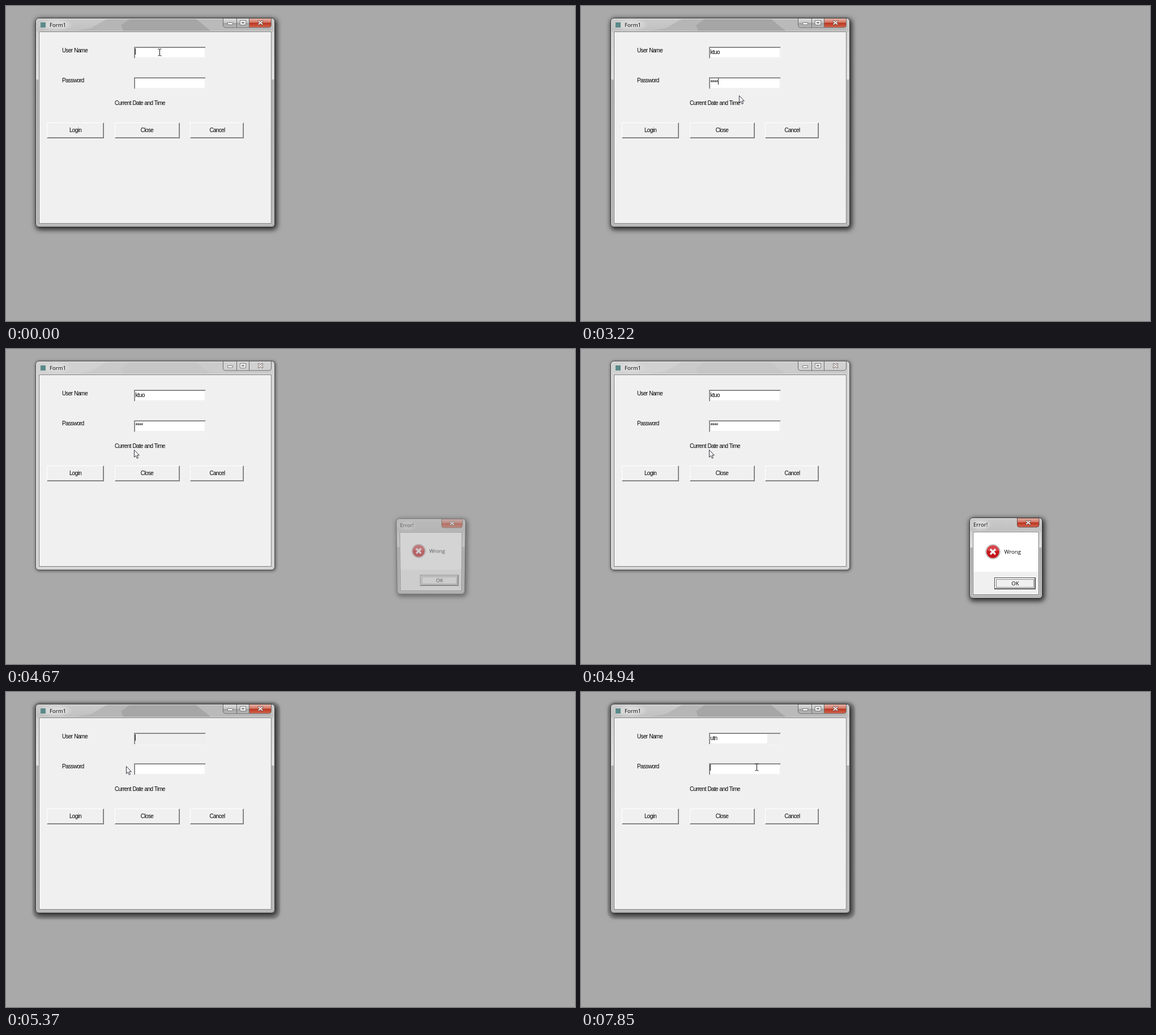
These frames come from a looping animation (1005 px wide and 557 px high, 8 s). An HTML page:

```html
<!DOCTYPE html>
<html lang="en">
<head>
<meta charset="utf-8">
<title>Login form</title>
<style>
html, body { margin: 0; width: 100%; height: 100%; overflow: hidden; background: #a9a9a9; }
body, .layer { position: absolute; left: 0; top: 0; }
.layer { width: 1005px; height: 557px; }
.layer > div { position: absolute; box-sizing: border-box; }
svg { position: absolute; left: 0; top: 0; }
text { font: 10px "Liberation Sans", Arial, sans-serif; letter-spacing: -.65px; word-spacing: .5px; fill: #000; white-space: pre; }
.ui { font: 9.6px "Open Sans", "Noto Sans", sans-serif; letter-spacing: 0; }
.mid { text-anchor: middle; }

.frame {
  border: 1px solid #333; border-radius: 6px;
  box-shadow: 2px 3px 9px 2px rgba(0,0,0,.72), inset 0 0 0 1px rgba(255,255,255,.5);
  background: linear-gradient(#cbcbcb, #c0c0c0 23px, #cfcfcf 24px, #dedede var(--sheen), #aaa var(--sheen), #b4b4b4);
}
#form { left: 52px; top: 21px; width: 423px; height: 370px; --sheen: 108px; }
.halo #form {
  box-shadow: 2px 3px 9px 2px rgba(0,0,0,.68), 2px 3.5px 2px 7px rgba(0,0,0,.14),
    inset 0 0 0 1px rgba(255,255,255,.5);
}
.idle #form {
  border-color: #4a4a4a; background: #d1d1d1;
  box-shadow: 1px 1px 5px 1px rgba(0,0,0,.45), inset 0 0 0 1px rgba(255,255,255,.6);
}
.idle .streak { opacity: .25; }
.idle .tint { display: none; }
.client { background: #f0f0f0; border: 1px solid #747474; box-shadow: 0 0 0 1px rgba(255,255,255,.45); }

.field {
  left: 226px; width: 127px; height: 21px; background: #fff;
  border: 1px solid; border-color: #a0a0a0 #f4f4f4 #f4f4f4 #a0a0a0;
  box-shadow: inset 1px 1px #757575, inset -1px -1px #ececec;
}
.btn {
  top: 206px; height: 28px; background: #f0f0f0;
  border: 1px solid; border-color: #fff #757575 #757575 #fff;
  box-shadow: inset -1px -1px #959595;
}
#dialog { transform-origin: 751px 369px; }
#box { left: 686px; top: 298px; width: 129px; height: 143px; --sheen: 52px; }
</style>
</head>
<body>
<div class="layer" id="window">
  <div class="frame" id="form"></div>
  <div class="client" style="left:58px;top:45px;width:411px;height:340px"></div>
  <div class="field" id="userBox" style="top:72px"></div>
  <div class="field" style="top:126px"></div>
  <div class="btn" style="left:72px;width:101px"></div>
  <div class="btn" style="left:192px;width:115px"></div>
  <div class="btn" style="left:325px;width:95px"></div>
  <svg width="1005" height="557">
    <defs>
      <linearGradient id="red" x2="0" y2="1">
        <stop offset="0" stop-color="#e6b3a8"/><stop offset=".45" stop-color="#d27563"/>
        <stop offset=".5" stop-color="#b9331f"/><stop offset="1" stop-color="#d5674e"/>
      </linearGradient>
      <linearGradient id="glass" x2="0" y2="1">
        <stop offset="0" stop-color="#dcdcdc"/><stop offset=".48" stop-color="#c4c4c4"/>
        <stop offset=".5" stop-color="#a0a0a0"/><stop offset="1" stop-color="#bcbcbc"/>
      </linearGradient>
      <radialGradient id="glow">
        <stop offset="0" stop-color="#e2e2e2"/><stop offset=".6" stop-color="#dadada" stop-opacity=".8"/>
        <stop offset="1" stop-color="#d0d0d0" stop-opacity="0"/>
      </radialGradient>
      <path id="cross" d="M-3-2.6 3 2.6M3-2.6-3 2.6"/>
    </defs>
    <g class="streak">
      <path d="M122 44 150 39 178 23H218L203 34 207 44Z" fill="#b6b6b6"/>
      <path d="M203 34 218 23H336L362 44H207Z" fill="#a6a6a6"/>
      <path d="M336 23H383V38H469V44H362Z" fill="#bababa"/>
    </g>
    <ellipse cx="88" cy="33" rx="32" ry="12" fill="url(#glow)"/>
    <rect x="61" y="29" width="9" height="9" fill="#5b8a8a"/>
    <text class="ui" x="77" y="37">Form1</text>

    <g class="tint">
      <path d="M383.5 22H429.5V38H387.5Q383.5 38 383.5 34Z" fill="url(#glass)"/>
      <path d="M429.5 22H468.5V34Q468.5 38 464.5 38H429.5Z" fill="url(#red)"/>
    </g>
    <path d="M383.5 22V34Q383.5 38 387.5 38H464.5Q468.5 38 468.5 34V22M407.5 22V38M429.5 22V38" fill="none" stroke="#6c6c6c"/>
    <g fill="#fff" stroke="#5c5c5c" stroke-width=".8">
      <rect x="391.5" y="29.5" width="9" height="3.5" rx=".5"/>
      <path d="M413.5 25.5H423.5V33.5H413.5ZM416.5 28.5V30.5H420.5V28.5Z" fill-rule="evenodd"/>
    </g>
    <g transform="translate(449.5 29.5)" fill="none" stroke-linecap="square">
      <use href="#cross" stroke="#55403d" stroke-width="3"/><use href="#cross" stroke="#fff" stroke-width="1.8"/>
    </g>

    <text x="99" y="82">User Name</text>
    <text x="99" y="135">Password</text>
    <text x="192" y="175">Current Date and Time</text>
    <text class="mid" x="122.5" y="223">Login</text>
    <text class="mid" x="249" y="223">Close</text>
    <text class="mid" x="373" y="223">Cancel</text>
    <text id="user" x="228.5" y="84.5"></text>
    <text id="pass" x="228.5" y="138.5"></text>
    <rect id="caret" width="1" height="11" fill="#222"/>
  </svg>
</div>

<div class="layer" id="dialog">
  <div class="frame" id="box"></div>
  <div class="client" style="left:692px;top:323px;width:117px;height:112px;background:linear-gradient(#fff 70px,#f0f0f0 70px)"></div>
  <svg width="1005" height="557">
    <ellipse cx="706" cy="311" rx="20" ry="11" fill="url(#glow)"/>
    <text class="ui" x="693" y="314">Error!</text>
    <path d="M770.5 299H809V311Q809 315 805 315H774.5Q770.5 315 770.5 311Z" fill="url(#red)" stroke="#6b4a45"/>
    <g transform="translate(790 307)" fill="none" stroke-linecap="square">
      <use href="#cross" stroke="#55403d" stroke-width="3"/><use href="#cross" stroke="#fff" stroke-width="1.7"/>
    </g>
    <circle cx="727.5" cy="358.5" r="12.8" fill="#d9d9d9" stroke="#9a9a9a" stroke-width=".8"/>
    <circle cx="727.5" cy="358.5" r="11.2" fill="#c4161c"/>
    <path d="M716.8 356A11 11 0 0 1 738.2 356Q728 361 716.8 356Z" fill="#d9464a"/>
    <path d="M723 354 732 363M732 354 723 363" stroke="#f4f4f4" stroke-width="3.2"/>
    <text class="ui" x="747.5" y="362">Wrong</text>
    <rect x="730.5" y="404.5" width="72" height="20" fill="#f0f0f0" stroke="#4c4c4c"/>
    <path d="M731.5 423V405.5H801" fill="none" stroke="#fff"/>
    <path d="M731 423.5H801.5V405" fill="none" stroke="#696969"/>
    <rect x="733.5" y="407.5" width="66" height="14" fill="none" stroke="#222" stroke-dasharray="1 1"/>
    <text class="ui mid" x="767" y="418">OK</text>
  </svg>
</div>

<svg width="1005" height="557">
  <path id="beam" d="M-2.5-6H-.5L.5-5 1.5-6H3.5M.5-5V5M-2.5 6H-.5L.5 5 1.5 6H3.5" fill="none" stroke="#111"/>
  <path id="arrow" d="M.5.5V13.3L3.4 10.6 5.4 15.4 7.5 14.5 5.5 9.9H9.3Z" fill="#fff" stroke="#1c1c2c" stroke-width=".9"/>
</svg>

<script>
const $ = id => document.getElementById(id);
const LOOP = 8000;
const beam = (x, y) => ({ cursor: ["beam", x, y] });
const arrow = (x, y) => ({ cursor: ["arrow", x, y] });
const hidden = { cursor: [] };
const caret = where => ({ caret: where });
const user = text => ({ user: text, caret: "user" });
const pass = count => ({ pass: count, caret: "pass" });
const dialog = (opacity, tilt = 0) => ({ opacity, tilt });

// Each step changes part of the scene from its time onwards.
const steps = [
  [0, user(""), pass(0), caret("user"), beam(271, 82), dialog(0), { look: "", white: 127 }],
  [280, caret("")],
  [560, beam(272, 83)],
  [830, caret("user")],
  [1420, caret("")],
  [1980, caret("user")],
  [2130, user("k"), hidden],
  [2410, user("ktuo")],
  [2540, arrow(276, 103)],
  [2670, beam(284, 137), caret("pass")],
  [2950, pass(2), hidden],
  [3080, pass(4)],
  [3220, arrow(279, 158)],
  [3370, arrow(262, 181)],
  [3510, arrow(240, 203)],
  [3650, arrow(220, 212)],
  [3800, arrow(203, 209), caret("")],
  [3940, arrow(193, 203)],
  [4090, arrow(211, 190)],
  [4240, arrow(226, 178), caret("pass")],
  [4520, caret(""), dialog(.15, 1.5), { look: "idle" }],
  [4670, dialog(.5, 1)],
  [4810, dialog(.88, .3)],
  [4940, dialog(1)],
  [5220, dialog(.4, 1), user(""), pass(0), caret("user"), { look: "halo", white: 0 }],
  [5370, dialog(0), arrow(212, 131)],
  [5500, beam(324, 87), { white: 102 }],
  [5640, beam(309, 85)],
  [5770, beam(297, 83), caret("")],
  [6330, user("u"), hidden],
  [6480, user("utn")],
  [6760, beam(302, 84)],
  [6890, beam(310, 87)],
  [7020, arrow(308, 104), caret("")],
  [7150, arrow(308, 117)],
  [7270, beam(311, 131)],
  [7540, beam(310, 133), caret("user")],
  [7850, caret("pass")],
];
let scene = {};
const scenes = steps.map(([time, ...parts]) => scene = Object.assign({}, scene, ...parts, { time }));

function draw(s) {
  $("window").className = "layer " + s.look;
  $("userBox").style.background = `linear-gradient(90deg, #fff ${s.white}px, #efefef ${s.white}px)`;
  $("user").textContent = s.user;
  $("pass").textContent = "*".repeat(s.pass);

  $("caret").style.display = s.caret ? "" : "none";
  if (s.caret) {
    const field = $(s.caret);
    const width = field.textContent ? field.getComputedTextLength() + 1 : 0;
    $("caret").setAttribute("x", Math.round(228 + width));
    $("caret").setAttribute("y", s.caret === "user" ? 75 : 128);
  }

  const [shape, x, y] = s.cursor;
  for (const id of ["beam", "arrow"]) $(id).style.display = id === shape ? "" : "none";
  if (shape) $(shape).setAttribute("transform", `translate(${x} ${y})`);

  const d = $("dialog").style;
  d.opacity = s.opacity;
  d.transform = s.tilt
    ? `translateY(${-2 * s.tilt}px) perspective(450px) scale(${1 - .06 * s.tilt}) rotateX(${-5 * s.tilt}deg)`
    : "none";
}

let shown;
function tick() {
  const t = performance.now() % LOOP;
  const now = scenes.findLast(s => s.time <= t);
  if (now !== shown) draw(shown = now);
  requestAnimationFrame(tick);
}
tick();
</script>
</body>
</html>
```
